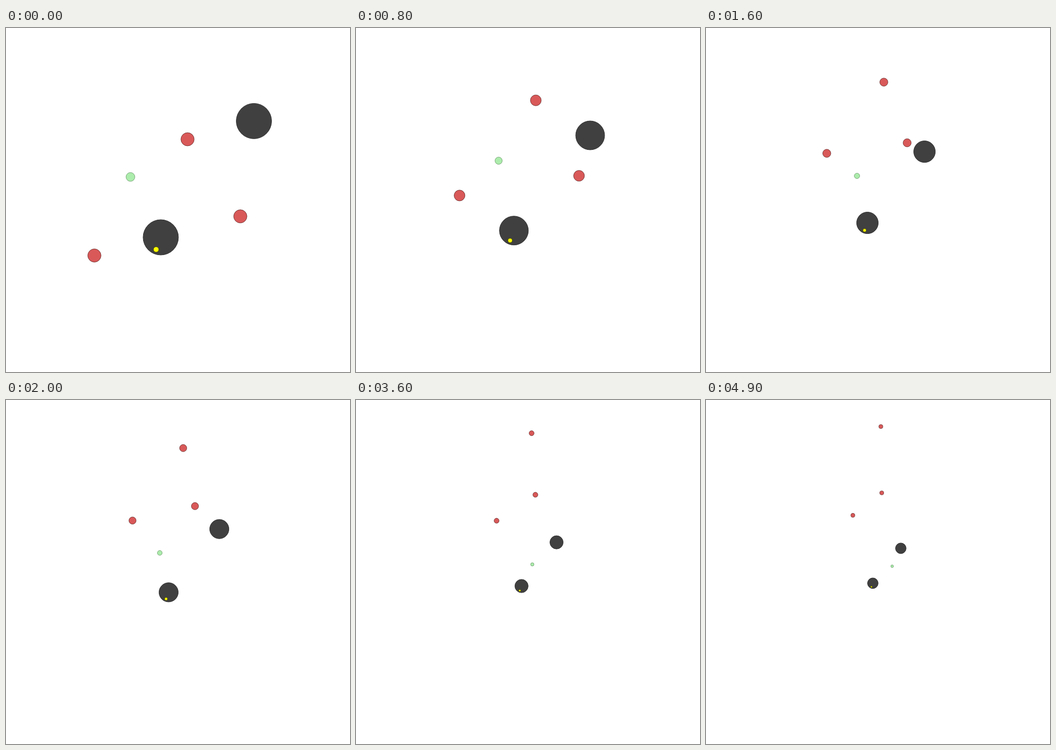
Write an HTML page with a canvas that moves like this. It is 700x700 px and loops after 5000 ms.

```html
<!DOCTYPE html>
<html lang="en">
<head>
<meta charset="utf-8">
<title>Pursuit</title>
<style>
html, body { margin: 0; width: 100%; height: 100%; overflow: hidden; background: #fff; }
canvas { display: block; }
</style>
</head>
<body>
<canvas id="stage" width="700" height="700"></canvas>
<script>
const ctx = document.getElementById('stage').getContext('2d');
const STEP = 100, STEPS = 50, HALF = 350;
const SPEED = 0.1, DELAY = 1.1; // units per step, steps lost while starting

const RED = { r: 0.075, fill: '#d95959', line: 'rgba(90,36,36,.8)' };
const GREEN = { r: 0.05, fill: '#acecac', line: 'rgba(60,110,60,.6)' };
const ROCK = { r: 0.2, fill: '#404040', line: '#303030' };
const FOOD = { r: 0.03, fill: '#ffff00', line: 'rgba(80,80,0,.85)' };

// World units have y pointing up; climb is the height gained at full speed.
const climb = k => SPEED * Math.max(0, k - DELAY);
const runnerY = k => 0.687 + climb(k);

// Straight travel between a few turning points [step, x, y].
function along(k, points) {
  let [a, b] = [points[0], points[0]];
  for (const p of points) {
    [a, b] = [b, p];
    if (p[0] >= k) break;
  }
  const f = Math.min(1, Math.max(0, (k - a[0]) / (b[0] - a[0] || 1)));
  return [a[1] + (b[1] - a[1]) * f, a[2] + (b[2] - a[2]) * f];
}

// Climbs at full speed, waits, then follows more slowly.
const leftChaser = k => [-0.946,
  Math.min(-0.628 + climb(k), 1.07) + 0.0455 * Math.max(0, k - 25.6)];

// Climbs until it meets the upper rock, then is pushed round it.
const rightChaser = k => along(k, [
  [2.8, 0.705, -0.185], [12.4, 0.705, 0.774], [20, 0.353, 1.37],
  [28, 0.235, 1.841], [36, 0.222, 2.325], [49, 0.141, 2.979]
]);

const prey = k => along(k, [
  [1, -0.538, 0.261], [8, -0.406, 0.543], [20, -0.379, 0.397],
  [28, -0.015, 0.314], [36, 0.13, 0.229], [49, 0.533, 0.218]
]);

function draw(k) {
  // The view widens to keep the farthest body one unit inside the edge.
  const scale = HALF / (1 + Math.max(0.946, runnerY(k)));
  const disc = ({ r, fill, line }, [x, y]) => {
    ctx.beginPath();
    ctx.arc(HALF + x * scale, HALF - y * scale, r * scale, 0, Math.PI * 2);
    ctx.fillStyle = fill;
    ctx.fill();
    ctx.strokeStyle = line;
    ctx.stroke();
  };
  ctx.fillStyle = '#fff';
  ctx.fillRect(0, 0, 2 * HALF, 2 * HALF);
  disc(RED, leftChaser(k));
  disc(RED, [0.108, runnerY(k)]);
  disc(RED, rightChaser(k));
  disc(GREEN, prey(k));
  disc(ROCK, [-0.195, -0.4225]);
  disc(ROCK, [0.859, 0.893]);
  disc(FOOD, [-0.2475, -0.5595]);
}

const start = performance.now();
function tick() {
  draw(Math.floor((performance.now() - start) / STEP) % STEPS);
  requestAnimationFrame(tick);
}
tick();
</script>
</body>
</html>
```
